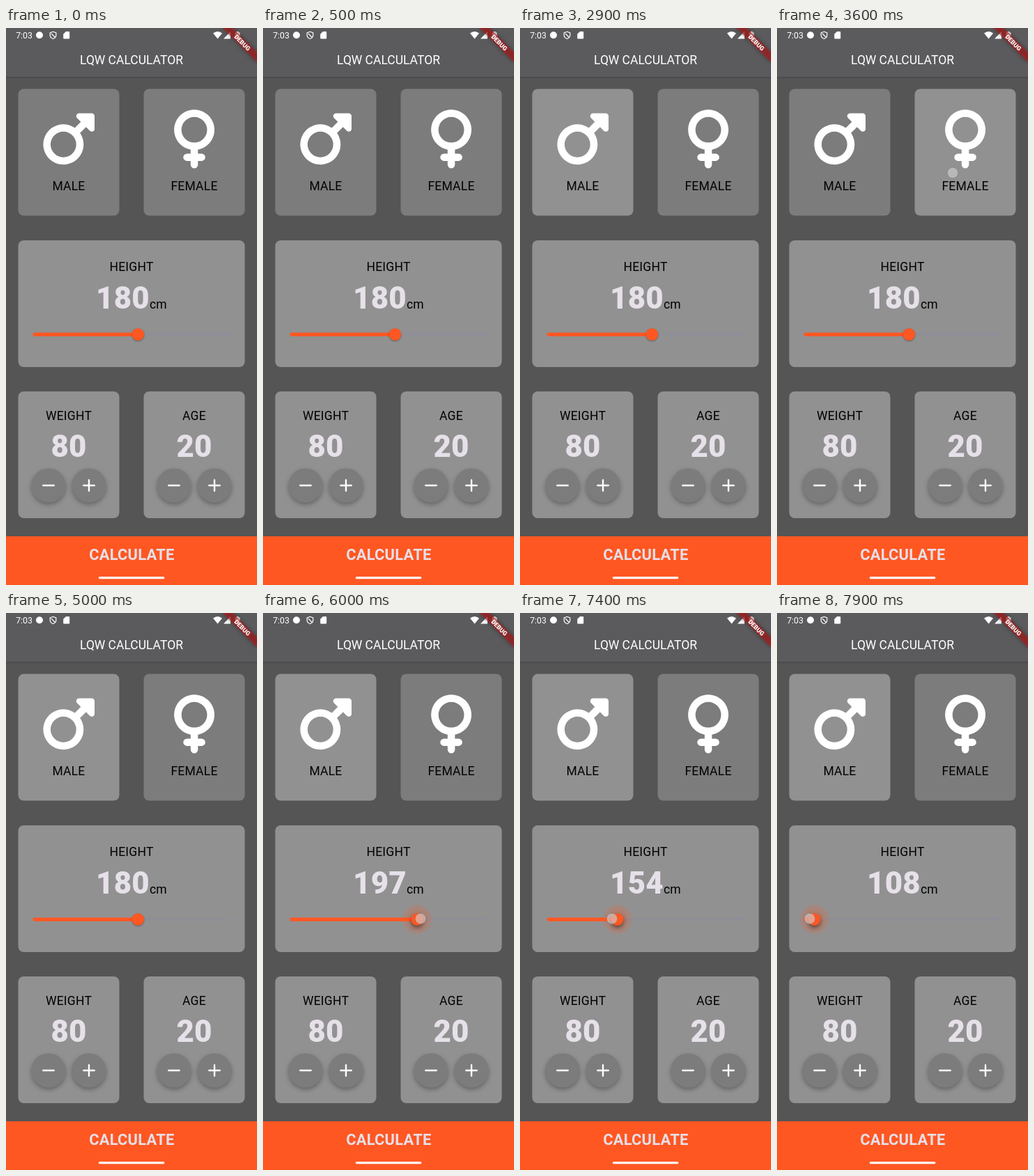
An HTML page that plays this animation: 360x800 px, repeating every 8 s.

```html
<!DOCTYPE html>
<html lang="en">
<head>
<meta charset="utf-8">
<title>Calculator</title>
<style>
  html, body { margin: 0; width: 100%; height: 100%; overflow: hidden; background: #555; }
  svg { display: block; width: 360px; height: 800px; font-family: Roboto, Inter, sans-serif; }
  text { text-anchor: middle; letter-spacing: .22px; }
  .label { font-size: 17.5px; fill: #000; }
  .num { font-size: 43.8px; font-weight: 900; fill: #e6e0e9; }
  .card { fill: #919191; }
  .fab { fill: #7c7c7c; filter: drop-shadow(0 3px 3px rgba(0, 0, 0, .3)); }
  .sign { stroke: #fff; stroke-width: 2.4; stroke-linecap: round; }
  .thumb { fill: #ff5722; filter: drop-shadow(0 1px 1px rgba(0, 0, 0, .35)); }
  .thumb.held { filter: drop-shadow(0 3px 3px rgba(0, 0, 0, .5)); }
</style>
</head>
<body>
<svg viewBox="0 0 360 800">
  <defs>
    <linearGradient id="edge" x2="0" y2="1">
      <stop stop-color="#000" stop-opacity=".16"/>
      <stop offset="1" stop-color="#000" stop-opacity="0"/>
    </linearGradient>
    <radialGradient id="halo">
      <stop stop-color="#ff5722" stop-opacity=".42"/>
      <stop offset=".6" stop-color="#ff5722" stop-opacity=".26"/>
      <stop offset="1" stop-color="#ff5722" stop-opacity=".12"/>
    </radialGradient>
  </defs>

  <rect width="360" height="800" fill="#555"/>
  <rect width="360" height="70" fill="#5b5b5e"/>
  <rect y="70" width="360" height="3" fill="url(#edge)"/>
  <text x="180" y="52" font-size="17.5" fill="#fff" style="letter-spacing:0">LQW CALCULATOR</text>

  <!-- status bar -->
  <g fill="#fff">
    <text x="26" y="15" font-size="12.3" style="letter-spacing:0">7:03</text>
    <circle cx="48" cy="10.3" r="5"/>
    <path d="M67.5 5.3l4.3 1.7v3.4q0 3.3-4.3 5.1q-4.3-1.8-4.3-5.1V7zM65 8l5 5" fill="none" stroke="#fff" stroke-width="1.2"/>
    <path d="M86 5h4.2q1 0 1 1v8.500q0 1-1 1h-7q-1 0-1-1V8.700z"/>
    <path d="M297 7.500q6.500-5 13 0L303.500 15.500z"/>
    <path d="M322 5v10.500h-10z"/>
    <path d="M328.500 6.500h2v-1.500h3v1.500h2v9h-7z"/>
  </g>

  <!-- gender cards -->
  <rect class="card" id="male" x="17.5" y="87.5" width="145" height="182" rx="8"/>
  <rect class="card" id="female" x="197.5" y="87.5" width="145" height="182" rx="8"/>
  <g fill="#fff" fill-rule="evenodd">
    <path transform="translate(53.400 117.300) scale(.1643)" d="M290 47c4-9 12-15 22-15h112c13 0 24 11 24 24v112c0 10-6 18-15 22s-19 2-26-5l-33-33-53 52a176 176 0 1 1-45-45l52-53-33-33c-7-7-9-17-5-26zM176 416a112 112 0 1 0 0-224 112 112 0 1 0 0 224z"/>
    <path transform="translate(238.500 117.300) scale(.1643)" d="M80 176a112 112 0 1 1 224 0a112 112 0 1 1-224 0zM224 349a176 176 0 1 0-64 0v35h-32a32 32 0 0 0 0 64h32v32a32 32 0 0 0 64 0v-32h32a32 32 0 0 0 0-64h-32z"/>
  </g>
  <text class="label" x="90" y="232.500">MALE</text>
  <text class="label" x="270" y="232.500">FEMALE</text>

  <!-- height card -->
  <rect class="card" x="17.5" y="305" width="325" height="182" rx="8"/>
  <text class="label" x="180" y="349">HEIGHT</text>
  <text x="180" y="403"><tspan class="num" id="height">180</tspan><tspan class="label">cm</tspan></text>
  <rect x="38.500" y="438.250" width="282.700" height="3.500" rx="1.750" fill="#8d8e98"/>
  <rect id="fill" x="38.500" y="437.400" height="5.250" rx="2.600" fill="#ff5722"/>
  <circle id="glow" cy="440" r="21" fill="url(#halo)"/>
  <circle class="thumb" id="thumb" cy="440" r="8.750"/>

  <g id="counters"></g>

  <!-- bottom button -->
  <rect y="730" width="360" height="70" fill="#ff5722"/>
  <text x="180.300" y="763.500" font-size="21.900" font-weight="700" fill="#e6e0e9">CALCULATE</text>
  <rect x="132.800" y="788" width="94.500" height="3.300" rx="1.650" fill="#fff"/>

  <!-- corner ribbon -->
  <g transform="translate(360) rotate(45)">
    <rect x="-35" y="24.500" width="70" height="10.500" fill="#b71c1c" fill-opacity=".63" style="filter:drop-shadow(0 0 3px rgba(0,0,0,.6))"/>
    <text y="33" font-size="8.900" font-weight="900" fill="#fff" style="letter-spacing:0">DEBUG</text>
  </g>

  <circle id="touch" r="7.800" fill="rgba(210,210,214,.6)" stroke="rgba(80,80,80,.3)"/>
</svg>

<script>
const LOOP = 8000, STEP = 100, LAG = 40;
const TRACK = { x: 38.5, width: 282.7, min: 100, range: 150 };
const $ = id => document.getElementById(id);

// Taps: finger down, selection, finger up, place, chosen card
const TAPS = [
  { down: 2000, pick: 2200, up: 2300, x: 119, y: 207, card: 'male' },
  { down: 3500, pick: 3600, up: 3700, x: 252, y: 208, card: 'female' },
  { down: 4400, pick: 4500, up: 4600, x: 119, y: 207, card: 'male' }
];

// Slider drag: time, finger x
const DRAG = [
  [5500, 189.3], [5700, 195], [5900, 214], [6100, 238], [6300, 254], [6450, 256],
  [6600, 246], [6800, 232], [7000, 205], [7200, 170], [7500, 113], [7900, 47], [8000, 40]
];
const DRAG_START = DRAG[0][0];

function counter(cx, name, value) {
  const button = (x, sign) => `<circle class="fab" cx="${x}" cy="657" r="24.5"/>
    <path class="sign" d="M${x - 7.700} 657h15.400${sign === '+' ? `M${x} 649.300v15.400` : ''}"/>`;
  return `<rect class="card" x="${cx - 72.5}" y="522" width="145" height="182" rx="8"/>
    <text class="label" x="${cx}" y="562.500">${name}</text>
    <text class="num" x="${cx}" y="616">${value}</text>
    ${button(cx - 29, '-')}${button(cx + 29, '+')}`;
}
$('counters').innerHTML = counter(90, 'WEIGHT', 80) + counter(270, 'AGE', 20);

function fingerX(t) {
  if (t <= DRAG_START) return DRAG[0][1];
  const i = DRAG.findIndex(p => p[0] >= t);
  const [t0, x0] = DRAG[i - 1], [t1, x1] = DRAG[i];
  return x0 + (x1 - x0) * (t - t0) / (t1 - t0);
}

function draw(t) {
  const picked = TAPS.filter(p => t >= p.pick).pop();
  for (const card of ['male', 'female'])
    $(card).style.fill = picked && picked.card === card ? '#919191' : '#7c7c7c';

  const held = t >= DRAG_START;
  const x = fingerX(t - LAG);
  $('thumb').setAttribute('cx', x);
  $('thumb').classList.toggle('held', held);
  $('fill').setAttribute('width', x - TRACK.x);
  $('glow').setAttribute('cx', x);
  $('glow').setAttribute('opacity', held ? Math.min(1, (t - DRAG_START) / 150) : 0);
  $('height').textContent = Math.round(TRACK.min + (x - TRACK.x) / TRACK.width * TRACK.range);

  const tap = TAPS.find(p => t >= p.down && t < p.up);
  const finger = held ? { x: fingerX(t), y: 439 } : tap;
  $('touch').style.display = finger ? '' : 'none';
  if (finger) {
    $('touch').setAttribute('cx', finger.x);
    $('touch').setAttribute('cy', finger.y);
  }
}

const start = performance.now();
function tick() {
  const t = (performance.now() - start) % LOOP;
  draw(Math.floor(t / STEP) * STEP);
  requestAnimationFrame(tick);
}
tick();
</script>
</body>
</html>
```
